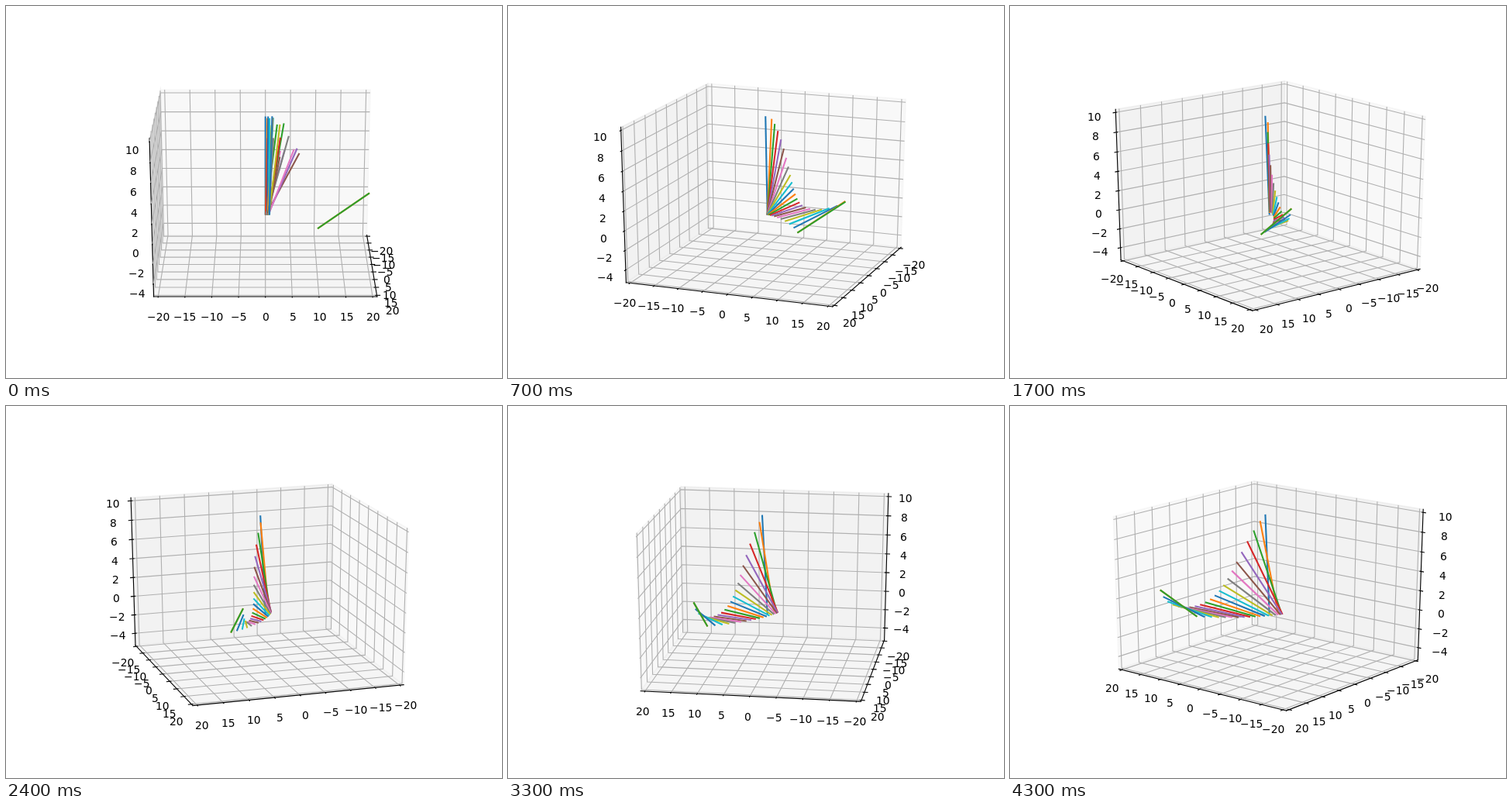
An HTML page with a canvas that plays this animation: 640 by 480 pixels, repeating every 4400 ms.

```html
<!DOCTYPE html>
<html lang="en">
<head>
<meta charset="utf-8">
<title>Turning 3D plot of rods</title>
<style>
  html, body { margin: 0; width: 100%; height: 100%; overflow: hidden; background: #fff; }
  canvas { display: block; }
</style>
</head>
<body>
<canvas id="stage" width="640" height="480"></canvas>
<script>
const ctx = document.getElementById('stage').getContext('2d');
const STEP = 100, STEPS = 44, DEGREES = 3;
const COLORS = ['#1f77b4', '#ff7f0e', '#2ca02c', '#d62728', '#9467bd',
                '#8c564b', '#e377c2', '#7f7f7f', '#bcbd22', '#17becf'];
const ROD_LENGTH = Math.sqrt(101);
const LAST = 21;
const THIN = 1.11, THICK = 2.08;
const radians = degrees => degrees * Math.PI / 180;

// Axis box: data limits, and the slightly larger box the panes span.
const LOW = [-20, -20, -5], HIGH = [20, 20, 10];
const SPAN = HIGH.map((h, i) => h - LOW[i]);
const CENTER = HIGH.map((h, i) => (h + LOW[i]) / 2);
const UNIT = SPAN.map(s => s / 12);
const MIN = LOW.map((v, i) => v - UNIT[i] / 4);
const MAX = HIGH.map((v, i) => v + UNIT[i] / 4);
const LABEL_OFFSET = 0.8857;

const range = (from, to, step) =>
  Array.from({ length: (to - from) / step + 1 }, (_, i) => from + i * step);
const AXES = [
  { ticks: range(-20, 20, 5), flip: 1, tickDir: 1, pane: 'rgba(242,242,242,.5)' },
  { ticks: range(-20, 20, 5), flip: 0, tickDir: 0, pane: 'rgba(230,230,230,.5)' },
  { ticks: range(-4, 10, 2), flip: 0, tickDir: 0, pane: 'rgba(236,236,236,.5)' }
];

// How the chain of rods runs from the origin to (10, 10), early on and once settled.
const FORMING = { dip: [0, 0], power: [7, 3.7], rise: 7.5, sharp: 1.3, turn: .75, hook: 10 };
const SETTLED = { dip: [2, 2.4], power: [2.4, 1], rise: 5.2, sharp: 1, turn: 1.25, hook: 8 };

// A pose is [base x, base y, tilt, heading], angles in degrees.
function chainPose(i, { dip, power, rise, sharp, turn, hook }) {
  const s = i / LAST;
  const swing = (Math.sin(1.131 * s) / Math.sin(1.131)) ** 2;
  const base = [s, swing].map((ease, c) =>
    (10 + dip[c]) * ease ** power[c] - dip[c] * (1 - Math.exp(-i / 1.2)));
  const tilt = 88.5 - 82.8 * Math.exp(-((i / rise) ** sharp))
    - 18 * Math.exp((i - LAST) / 3.4);
  const heading = 44 * Math.min(1, i) + turn * i + (42.2 - LAST * turn) * s ** hook;
  return [...base, tilt, heading];
}

function scatteredPose(i) {
  if (i === LAST) return chainPose(i, SETTLED);
  const tilt = 6 + 42 * Math.sin(Math.PI * i / 10) ** 2;
  const heading = i ? 60 * ((.745 + .435 * i) % 1) : 0;
  return [0, .04 * i, tilt, heading];
}

const mix = (a, b, t) => a.map((v, i) => v + (b[i] - v) * t);

function pose(i, step) {
  const forming = chainPose(i, FORMING);
  return step < 7
    ? mix(forming, scatteredPose(i), .5 ** step)
    : mix(chainPose(i, SETTLED), forming, .82 ** (step - 7));
}

function camera(azimuth) {
  const cosA = Math.cos(azimuth), sinA = Math.sin(azimuth);
  const cosE = Math.cos(radians(20)), sinE = Math.sin(radians(20));
  return point => {
    const [x, y, z] = point.map((v, i) => (v - CENTER[i]) / SPAN[i]);
    const near = x * cosA + y * sinA;
    const depth = 10 - near * cosE - z * sinE;
    return [334.7 + 2681.08 * (y * cosA - x * sinA) / depth,
            237.4 - 1997.84 * (z * cosE - near * sinE) / depth];
  };
}

function trace(points) {
  ctx.beginPath();
  points.forEach(p => ctx.lineTo(p[0], p[1]));
}

function line(points, color, width, cap) {
  trace(points);
  ctx.strokeStyle = color;
  ctx.lineWidth = width;
  ctx.lineCap = cap;
  ctx.stroke();
}

const withValue = (point, axis, value) => point.map((v, i) => i === axis ? value : v);
const flipped = (point, axis) =>
  withValue(point, axis, point[axis] === MAX[axis] ? MIN[axis] : MAX[axis]);

function drawPane(project, far, axis) {
  const b = (axis + 1) % 3, c = (axis + 2) % 3;
  const side = flipped(far, b);
  trace([far, side, flipped(side, c), flipped(far, c)].map(project));
  ctx.closePath();
  ctx.fillStyle = ctx.strokeStyle = AXES[axis].pane;
  ctx.lineWidth = 1.39;
  ctx.fill();
  ctx.stroke();
}

function drawLabel(value, [x, y]) {
  const text = String(value).replace('-', '\u2212');
  const left = Math.round(x - ctx.measureText(text).width / 2 + .5);
  ctx.fillStyle = '#000';
  ctx.fillText(text, left, Math.ceil(y + 10.5));
}

function drawAxis(project, far, axis) {
  const { ticks, flip, tickDir } = AXES[axis];
  const edge = flipped(far, flip);
  line([edge, flipped(edge, axis)].map(project), '#000', THIN, 'square');

  for (const tick of ticks) {
    const corner = withValue(far, axis, tick);
    const ends = [flipped(corner, (axis + 1) % 3), corner, flipped(corner, (axis + 2) % 3)];
    line(ends.map(project), '#b0b0b0', THIN, 'butt');
  }

  const out = far[tickDir] === MAX[tickDir] ? -1 : 1;
  for (const tick of ticks) {
    const at = withValue(edge, axis, tick);
    const mark = [-.1, .2].map(k =>
      project(withValue(at, tickDir, at[tickDir] + k * out * UNIT[tickDir])));
    line(mark, '#000', THIN, 'butt');
    const label = at.map((v, i) =>
      i === axis ? v : v + Math.sign(v - CENTER[i]) * LABEL_OFFSET * UNIT[i]);
    drawLabel(tick, project(label));
  }
}

function drawRod(project, [x, y, tilt, heading], color) {
  const reach = ROD_LENGTH * Math.sin(radians(tilt));
  const tip = [x + reach * Math.cos(radians(heading)),
               y + reach * Math.sin(radians(heading)),
               ROD_LENGTH * Math.cos(radians(tilt))];
  line([[x, y, 0], tip].map(project), color, THICK, 'square');
}

function draw(step) {
  const azimuth = radians(step * DEGREES);
  const project = camera(azimuth);
  const far = [Math.cos(azimuth) > -1e-9 ? MIN[0] : MAX[0], MIN[1], MIN[2]];

  ctx.fillStyle = '#fff';
  ctx.fillRect(0, 0, 640, 480);
  ctx.font = '13.89px "DejaVu Sans", sans-serif';
  for (let axis = 0; axis < 3; axis++) drawPane(project, far, axis);
  for (let axis = 0; axis < 3; axis++) drawAxis(project, far, axis);
  for (let i = 0; i <= LAST; i++) drawRod(project, pose(i, step), COLORS[i % 10]);
  drawRod(project, chainPose(LAST, SETTLED), COLORS[2]);
}

function tick() {
  draw(Math.floor(performance.now() / STEP) % STEPS);
  requestAnimationFrame(tick);
}
tick();
</script>
</body>
</html>
```
